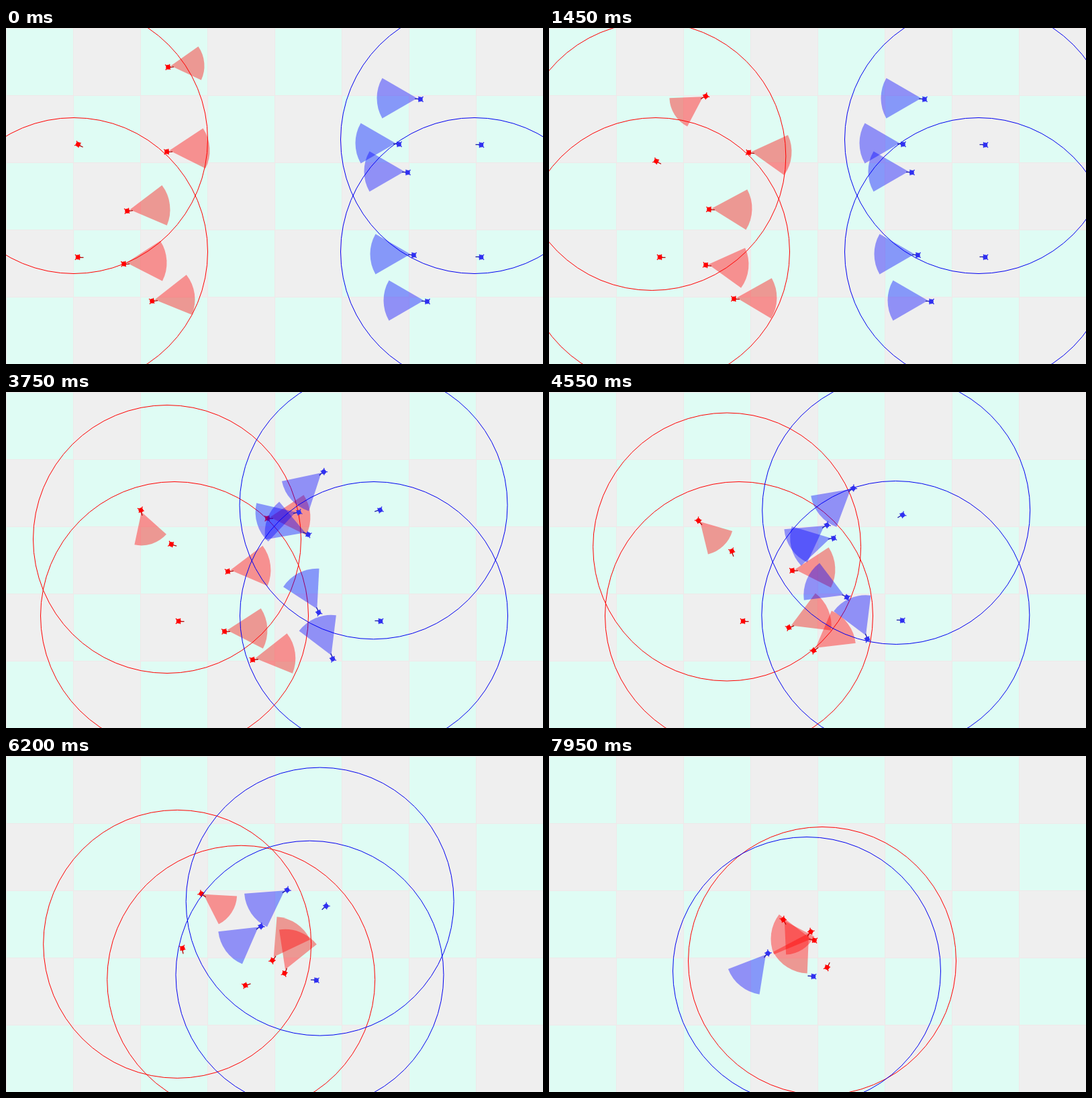
These frames come from a looping animation (800x500 px, 8000 ms). An HTML page with a canvas:

```html
<!DOCTYPE html>
<html lang="en">
<head>
<meta charset="utf-8">
<title>Skirmish</title>
<style>
  html, body { margin: 0; width: 100%; height: 100%; overflow: hidden; background: #efefef; }
  canvas { display: block; }
</style>
</head>
<body>
<canvas id="stage" width="800" height="500"></canvas>
<script>
const ctx = document.getElementById('stage').getContext('2d');
const LOOP = 8, STEP = 0.05, SPEED = 40, CELL = 100, VIEW = Math.PI / 6;
const RED = { body: '#ff0000', gun: '#b00000', cone: 'rgba(255,0,0,.4)', sway: 5 };
const BLUE = { body: '#3030f0', gun: '#1818a8', cone: 'rgba(0,0,255,.4)', sway: 0 };

const direction = degrees => {
  const a = degrees * Math.PI / 180;
  return [Math.cos(a), Math.sin(a)];
};

function advance({ x, y, heading }, seconds) {
  const [dx, dy] = direction(heading), run = SPEED * seconds;
  return { x: x + dx * run, y: y + dy * run, heading };
}

// Units drive forward at one speed, so their headings give the tangents of a Hermite curve.
function steer(a, b, t) {
  const span = b.t - a.t, u = (t - a.t) / span;
  const from = direction(a.heading), to = direction(b.heading);
  const blend = u * u * (3 - 2 * u);
  const leave = u * (1 - u) ** 2 * SPEED * span, arrive = u * u * (u - 1) * SPEED * span;
  return {
    x: a.x + (b.x - a.x) * blend + from[0] * leave + to[0] * arrive,
    y: a.y + (b.y - a.y) * blend + from[1] * leave + to[1] * arrive,
    heading: a.heading + (b.heading - a.heading) * u
  };
}

// A unit with sight 0 is a leader: it has a command ring instead of a view cone.
class Unit {
  constructor(team, sight, x, y, heading) {
    Object.assign(this, { team, sight, death: Infinity, path: [{ t: 0, x, y, heading }] });
  }
  march(until) {
    const last = this.path.at(-1);
    this.path.push({ t: until, ...advance(last, until - last.t) });
    return this;
  }
  to(t, x, y, heading) {
    this.path.push({ t, x, y, heading });
    return this;
  }
  dies(t) {
    this.death = t;
    return this;
  }
  pose(t) {
    const next = this.path.findIndex(point => point.t > t);
    const last = this.path.at(-1);
    const pose = next < 0 ? advance(last, t - last.t) : steer(this.path[next - 1], this.path[next], t);
    if (this.sight) pose.heading -= this.team.sway * Math.cos(2 * Math.PI * t / 3.75);
    return pose;
  }
}

const red = (sight, x, y, heading = 0) => new Unit(RED, sight, x, y, heading);
const blue = (sight, x, y) => new Unit(BLUE, sight, x, y, 180).march(2.6);

const units = [
  red(0, 109, 341).march(5.4).to(7.95, 415, 313, -65),
  red(0, 109, 174, 25.5).march(2.45)
    .to(3.75, 248, 227, 14).to(5.4, 273, 260, 128).to(6.95, 276, 310, 32).dies(7.8),
  red(50, 243.5, 58)
    .to(1.45, 232, 102.5, 144).to(3.75, 201.5, 177.5, 77).to(5.4, 260.5, 196.5, 16).to(7.95, 350, 245, 61),
  red(60, 241.5, 184, 1.5).dies(4.1),
  red(60, 182.5, 272, -2).dies(4.7),
  red(60, 177.5, 351, 2).march(3.75)
    .to(5.4, 387, 330, -47).to(6.95, 403.5, 274, -69).to(7.95, 389, 263, -234),
  red(60, 219.5, 406, -3).march(3.75)
    .to(5.4, 412.5, 353, -70).to(6.95, 418, 292, -73).to(7.95, 393.5, 274, -169),

  blue(0, 706, 174).to(5.4, 498, 202, 134).to(6.95, 454, 245, 138).dies(7.3),
  blue(0, 706, 341).march(3.75).to(7.95, 392, 328, 182),
  blue(60, 615.5, 106).to(3.75, 472, 120, 138).to(6.95, 396, 220, 148).dies(7.25),
  blue(60, 583.5, 173)
    .to(3.75, 434.5, 179.5, 163).to(5.4, 396, 229, 126).to(6.95, 356.5, 271.5, 160).to(7.95, 325, 295, 129),
  blue(60, 596.5, 215).to(3.75, 448.5, 211.5, 200).to(5.4, 399, 244, 131).dies(6.2),
  blue(60, 605.5, 338).to(3.75, 465, 326.5, 243).to(5.4, 409.5, 302.5, 160).dies(6),
  blue(60, 625.5, 407).to(3.75, 486, 395.5, 247).dies(4.6)
];

function drawBoard() {
  for (let x = 0; x < 800; x += CELL)
    for (let y = 0; y < 500; y += CELL) {
      ctx.fillStyle = '#efe9e9';
      ctx.fillRect(x, y, CELL, CELL);
      ctx.fillStyle = (x + y) / CELL % 2 ? '#efefef' : '#dffcf4';
      ctx.fillRect(x + 1, y + 1, CELL - 1, CELL - 1);
    }
}

function drawCone(x, y, radius, angle, color) {
  ctx.fillStyle = color;
  ctx.beginPath();
  ctx.moveTo(x, y);
  ctx.arc(x, y, radius, angle - VIEW, angle + VIEW);
  ctx.fill();
}

function drawRing(x, y, color) {
  ctx.strokeStyle = color;
  ctx.lineWidth = 1;
  ctx.beginPath();
  ctx.arc(x, y, 199.5, 0, Math.PI * 2);
  ctx.stroke();
}

function line(x1, y1, x2, y2, color) {
  ctx.strokeStyle = color;
  ctx.beginPath();
  ctx.moveTo(x1, y1);
  ctx.lineTo(x2, y2);
  ctx.stroke();
}

function drawBody(x, y, angle, team) {
  ctx.save();
  ctx.translate(x, y);
  ctx.rotate(angle);
  ctx.lineWidth = 1.3;
  line(-4.5, -4, 2.5, 4, team.body);
  line(-4.5, 4, 2.5, -4, team.body);
  line(0, 0.5, 8, 0.5, team.gun);
  ctx.fillStyle = team.body;
  ctx.beginPath();
  ctx.arc(-0.3, 0, 3.5, 0, Math.PI * 2);
  ctx.fill();
  ctx.restore();
}

function drawUnit({ team, sight, ...rest }, { x, y, heading }) {
  const [dx, dy] = direction(heading), angle = heading * Math.PI / 180;
  if (sight) drawCone(x + 2.5 * dx - 0.5, y + 2.5 * dy - 1.5, sight, angle, team.cone);
  else drawRing(x - 8, y - 8, team.body === RED.body ? team.body : '#0000f0');
  drawBody(x - 1.5 * dx, y - 1.5 * dy, angle, team);
}

function frame() {
  const t = Math.floor(performance.now() / 1000 % LOOP / STEP) * STEP;
  drawBoard();
  for (const unit of units) if (t < unit.death) drawUnit(unit, unit.pose(t));
  requestAnimationFrame(frame);
}
frame();
</script>
</body>
</html>
```
